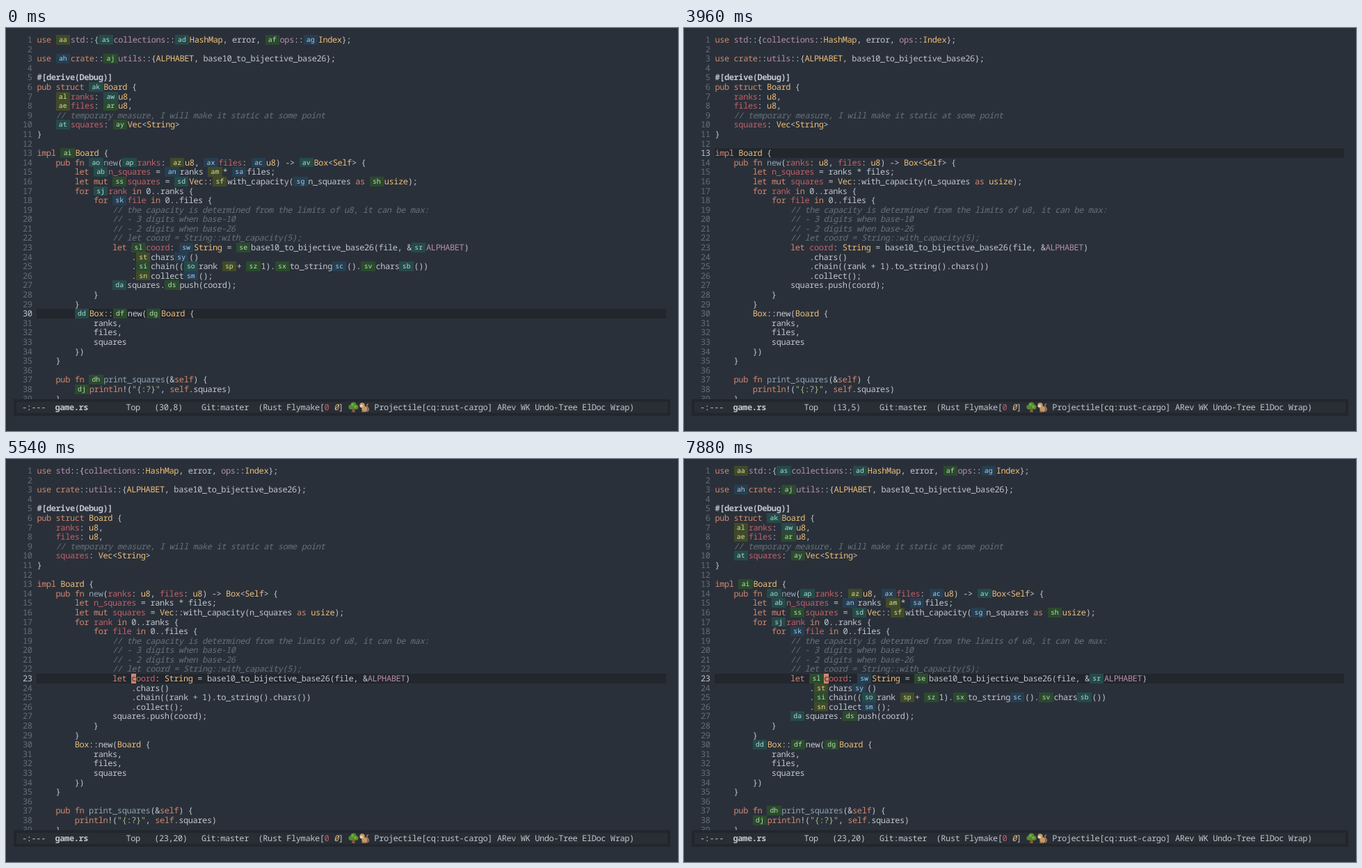
An HTML page that plays this animation: 966 by 580 pixels, repeating every 8000 ms.

```html
<!DOCTYPE html>
<html lang="en">
<head>
<meta charset="utf-8">
<title>Jump hints in a code editor</title>
<style>
html, body { margin: 0; width: 100%; height: 100%; overflow: hidden; background: #2a3039; }
#stage {
  position: relative; width: 966px; height: 580px; overflow: hidden; white-space: pre;
  color: #c0c5ce; font: 12px/13.6px "Noto Sans Mono", "DejaVu Sans Mono", monospace;
  font-variant-ligatures: none; text-rendering: geometricPrecision;
  letter-spacing: calc(6.79px - 1ch);
}
#stage > div { position: absolute; }
#line { left: 44.4px; width: 904.6px; height: 13.6px; background: #22262d; }
#code { left: 24px; top: 10px; width: 930px; height: 523.5px; overflow: hidden; }
#code > div { height: 13.6px; }
#cursor { width: 6.8px; height: 13.6px; background: #d08770; color: #2a3039; }
#mode {
  left: 11px; top: 533.5px; width: 928px; height: 16px; padding-left: 8px; line-height: 16px;
  background: #282d36; border: 4px solid #22262d;
}
#mode svg { vertical-align: top; }
.num { color: #636e7a; }
.now .num { color: #c0c5ce; }
.cm { color: #65717c; font-style: italic; }
.str { color: #a3be8c; }
.pre { font-weight: bold; }
.kw { color: #d08770; }
.mod { color: #b48ead; }
.ty { color: #ecbe7b; }
.fn { color: #8fa1b3; }
.var { color: #bf616a; }
.warn { color: #ecbe7b; font-style: italic; }
.hint { display: none; }
.hints .hint {
  display: inline-block; vertical-align: top; width: 20.4px; height: 13.6px; margin-right: .7px;
  font-size: 9.8px; letter-spacing: 0; text-align: center;
}
.g { background: #2b4a2e; color: #b5dfae; }
.t { background: #264a49; color: #a9dcd6; }
.n { background: #263e51; color: #a9cbe6; }
.o { background: #404a28; color: #d3dda2; }
</style>
</head>
<body>
<div id="stage">
  <div id="line"></div>
  <div id="code"></div>
  <div id="cursor"></div>
  <div id="mode">-:---  <b>game.rs</b>        Top   <span id="pos"></span>Git:master  (Rust Flymake[<span class="var">0</span> <span class="warn">0</span>] <svg width="31" height="16"><path d="M6 9h3l1 6H5z" fill="#8a5a3c"/><g fill="#558b2f"><circle cx="7.5" cy="4.5" r="4"/><circle cx="4" cy="7.5" r="3.6"/><circle cx="11" cy="7.5" r="3.6"/></g><g fill="#7cb342"><circle cx="6" cy="4" r="1.8"/><circle cx="10" cy="7" r="1.8"/></g><path d="M27 14q4-2 1-6t1-5" fill="none" stroke="#b0855a" stroke-width="1.4"/><ellipse cx="23.5" cy="10.5" rx="4.2" ry="4.3" fill="#c4986a"/><circle cx="20" cy="5" r="3.7" fill="#c4986a"/><ellipse cx="19" cy="6" rx="2.3" ry="2" fill="#ecd0a6"/><path d="M19 14.3h7" stroke="#966b44" stroke-width="1.4"/></svg> Projectile[cq:rust-cargo] ARev WK Undo-Tree ElDoc Wrap)</div>
</div>
<script>
// ~xab~ marks jump label "ab" with tint x
const source = `use ~oaa~std::{~tas~collections::~tad~HashMap, error, ~gaf~ops::~nag~Index};

use ~nah~crate::~gaj~utils::{ALPHABET, base10_to_bijective_base26};

#[derive(Debug)]
pub struct ~tak~Board {
    ~oal~ranks: ~taw~u8,
    ~oae~files: ~gar~u8,
    // temporary measure, I will make it static at some point
    ~tat~squares: ~gay~Vec<String>
}

impl ~gai~Board {
    pub fn ~tao~new(~tap~ranks: ~oaz~u8, ~nax~files: ~nac~u8) -> ~tav~Box<Self> {
        let ~tab~n_squares = ~nan~ranks ~oam~* ~nsa~files;
        let mut ~gss~squares = ~tsd~Vec::~osf~with_capacity(~nsg~n_squares as ~gsh~usize);
        for ~tsj~rank in 0..ranks {
            for ~nsk~file in 0..files {
                // the capacity is determined from the limits of u8, it can be max:
                // - 3 digits when base-10
                // - 2 digits when base-26
                // let coord = String::with_capacity(5);
                let ~gsl~coord: ~nsw~String = ~gse~base10_to_bijective_base26(file, &~tsr~ALPHABET)
                    .~ost~chars~nsy~()
                    .~gsi~chain((~tso~rank ~osp~+ ~gsz~1).~gsx~to_string~nsc~().~gsv~chars~tsb~())
                    .~osn~collect~nsm~();
                ~tda~squares.~gds~push(coord);
            }
        }
        ~tdd~Box::~gdf~new(~gdg~Board {
            ranks,
            files,
            squares
        })
    }

    pub fn ~gdh~print_squares(&self) {
        ~gdj~println!("{:?}", self.squares)
    }`;

const syntax = new RegExp([
  /~(?<tint>\w)(?<label>\w\w)~/,
  /(?<cm>\/\/.*)/,
  /(?<str>".*?")/,
  /(?<pre>#\[.*\])/,
  /(?<kw>\b(?:use|crate|pub|struct|impl|fn|let|mut|for|in|as|self|println)\b)/,
  /(?<mod>\b(?:std|collections|ops|utils)\b|(?<=&(?:~\w+~)?)ALPHABET)/,
  /(?<ty>\b(?:[A-Z]\w*|u8|usize)\b)/,
  /(?<fn>(?<=fn (?:~\w+~)?)\w+)/,
  /(?<var>(?<=(?:let|for) (?:mut )?(?:~\w+~)?)\w+|\w+(?=:(?!:)))/,
  /\w+|./
].map(r => r.source).join("|"), "g");

const esc = s => s.replace(/&/g, "&amp;").replace(/</g, "&lt;");
const span = (cls, text) => `<span class="${cls}">${esc(text)}</span>`;

function paint(text) {
  return text.replace(syntax, (...args) => {
    const { tint, label, ...kinds } = args.at(-1);
    if (label) return span("hint " + tint, label);
    const kind = Object.keys(kinds).find(k => kinds[k]);
    return kind ? span(kind, args[0]) : esc(args[0]);
  });
}

const $ = id => document.getElementById(id);
$("code").innerHTML = source.split("\n").map((text, i) =>
  `<div>${span("num", String(i + 1).padStart(2))} ${paint(text)}</div>`).join("");

const LOOP = 8000, CELL = 6.79, ROW = 13.6, HINT = 21.1;
const scenes = [
  { at: 0, row: 30, col: 8, char: "B", hints: true },
  { at: 2460, row: 13, col: 5, char: "B", hints: false },
  { at: 4130, row: 13, col: 5, char: "B", hints: true },
  { at: 5540, row: 23, col: 20, char: "c", hints: false },
  { at: 6830, row: 23, col: 20, char: "c", hints: true }
];
// the cursor starts hidden and flips at each of these times
const blinks = [80, 630, 1130, 1630, 2130, 2960, 3460, 3960, 4130, 4630, 5170, 6040, 6540, 7380, 7880];
let shown;

function show({ row, col, char, hints }) {
  const top = 10 + (row - 1) * ROW + "px";
  $("stage").classList.toggle("hints", hints);
  [...$("code").children].forEach((el, i) => el.classList.toggle("now", i + 1 === row));
  $("line").style.top = $("cursor").style.top = top;
  $("cursor").style.left = 44.4 + col * CELL + (hints ? HINT : 0) + "px";
  $("cursor").textContent = char;
  $("pos").textContent = `(${row},${col})`.padEnd(10);
}

function frame() {
  const t = performance.now() % LOOP;
  const scene = scenes.findLast(s => s.at <= t);
  if (scene !== shown) show(shown = scene);
  const on = blinks.filter(b => b <= t).length % 2;
  $("cursor").style.visibility = on ? "visible" : "hidden";
  requestAnimationFrame(frame);
}
frame();
</script>
</body>
</html>
```
